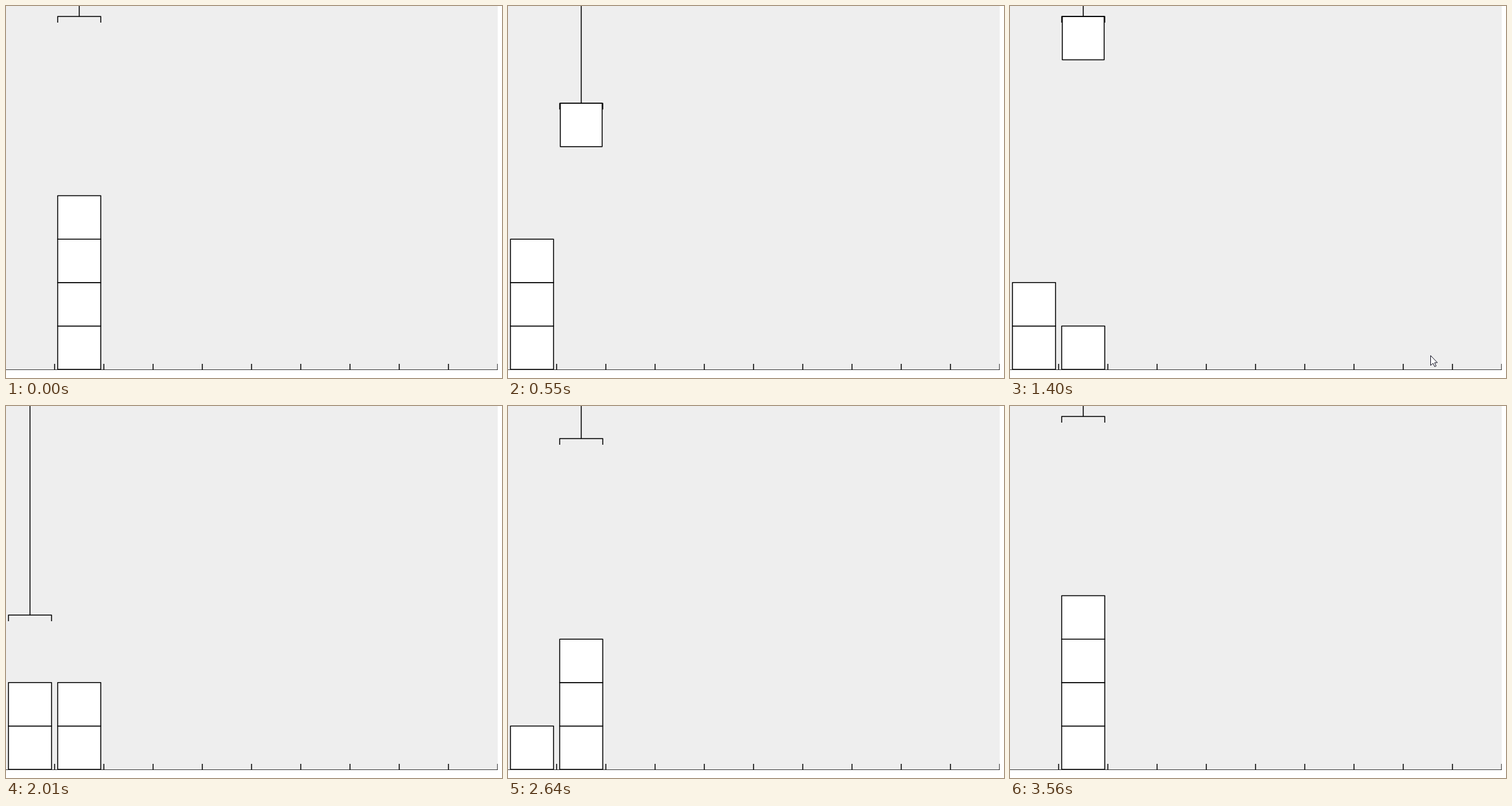
An HTML page with a canvas that plays this animation: 806x605 px, repeating every 3.73 s.

```html
<!DOCTYPE html>
<html lang="en">
<head>
<meta charset="utf-8">
<title>Crane stacking blocks</title>
<style>
  html, body { margin: 0; width: 100%; height: 100%; overflow: hidden; background: #fff; }
  canvas { display: block; }
</style>
</head>
<body>
<canvas id="stage" width="806" height="605"></canvas>
<script>
const ctx = document.getElementById('stage').getContext('2d');

const LOOP = 3730, HOLD = 170, STEPS = 45;
const SCENE_W = 799, SCENE_H = 592;
const COLUMN = 80, BOX = 70, PITCH = 70.6, GROUND = 591;
const TOP = 17, SPEED = 35.3, SIDE_TICKS = 3, BLOCKS = 4;

// Steps last 80 ms, except these, which last 70 ms.
const shortSteps = new Set([1, 4, 7, 10, 14, 17, 20, 23, 27, 33, 36, 39, 43]);
const starts = [0, HOLD];
for (let k = 0; k < STEPS - 1; k++) {
  starts.push(starts[k + 1] + (shortSteps.has(k) ? 70 : 80));
}

// Crane progress in ticks at some steps, linear in between.
const progress = [[0, -1.4], [6, 28], [17, 82], [25, 120.15], [33, 160.98], [39, 189.99], [45, 219]];

function tickAt(step) {
  const i = progress.findIndex(([s], n) => n > 0 && step <= s);
  const [s0, t0] = progress[i - 1], [s1, t1] = progress[i];
  return t0 + (t1 - t0) * (step - s0) / (s1 - s0);
}

const levelTop = level => GROUND - PITCH * level;

// Every block: go left, down, up, go right, down, up.
const moves = [];
for (let block = 0; block < BLOCKS; block++) {
  const moved = block + 1;
  const pick = levelTop(BLOCKS - block), drop = levelTop(moved);
  const move = (type, column, target, holding, left, right) => moves.push({
    type, column, target, holding, left, right,
    ticks: type === 'side' ? SIDE_TICKS : Math.ceil((target - TOP) / SPEED)
  });
  const before = BLOCKS - block, after = before - 1;
  move('side', 0, TOP, false, before, block);
  move('down', 0, pick, false, before, block);
  move('up', 0, pick, true, after, block);
  move('side', 1, TOP, true, after, block);
  move('down', 1, drop, true, after, block);
  move('up', 1, drop, false, after, moved);
}

function craneState(step) {
  let tick = tickAt(step);
  if (tick > 0) {
    for (const m of moves) {
      if (tick > m.ticks) { tick -= m.ticks; continue; }
      let x = m.column * COLUMN, y = TOP;
      if (m.type === 'side') {
        const rest = Math.max(0, COLUMN - tick * SPEED);
        x += m.column ? -rest : rest;
      } else {
        const way = m.type === 'down' ? tick : m.ticks - tick;
        y = Math.min(TOP + way * SPEED, m.target);
      }
      return { ...m, x, y };
    }
  }
  return { x: COLUMN, y: TOP, holding: false, left: 0, right: BLOCKS };
}

function lines(...paths) {
  ctx.beginPath();
  for (const path of paths) {
    path.forEach(([x, y], i) => i ? ctx.lineTo(x, y) : ctx.moveTo(x, y));
  }
  ctx.stroke();
}

function box(x, y, w, h) {
  ctx.beginPath();
  ctx.rect(x, y, w, h);
  ctx.fill();
  ctx.stroke();
}

function stack(column, count) {
  for (let i = 1; i <= count; i++) {
    box(column * COLUMN + 4, levelTop(i), BOX, PITCH);
  }
}

function crane({ x, y, holding }) {
  const left = x + 4, right = left + BOX, middle = x + 39;
  if (holding) box(left + 1, y, BOX - 2, PITCH);
  lines([[middle, 0], [middle, y]],
        [[left, y + 10], [left, y], [right, y], [right, y + 10]]);
}

// The mouse pointer crosses the scene and leaves at the lower right.
const pointerX = [326, 470, 590, 683, 775], POINTER_FIRST = 14;
const arrow = [[0, 0], [0, 16], [4, 12.5], [6.5, 18], [9, 17], [6.5, 11.5], [11, 11.5]];

function pointer(step) {
  const x = pointerX[step - POINTER_FIRST];
  if (x === undefined) return;
  const y = Math.round(568 + (x - 683) * 0.26);
  ctx.save();
  ctx.translate(x + 0.5, y + 0.5);
  ctx.lineWidth = 1;
  ctx.strokeStyle = '#112';
  ctx.beginPath();
  arrow.forEach(([px, py]) => ctx.lineTo(px, py));
  ctx.closePath();
  ctx.fill();
  ctx.stroke();
  ctx.restore();
}

function draw(time) {
  let step = STEPS;
  while (starts[step] > time) step--;
  const state = craneState(step);

  ctx.fillStyle = '#fff';
  ctx.fillRect(0, 0, 806, 605);
  ctx.save();
  ctx.beginPath();
  ctx.rect(0, 0, SCENE_W, SCENE_H);
  ctx.clip();
  ctx.fillStyle = '#eee';
  ctx.fillRect(0, 0, SCENE_W, SCENE_H);

  ctx.fillStyle = '#fff';
  ctx.strokeStyle = '#000';
  ctx.lineWidth = 1.5;
  ctx.lineJoin = 'round';
  lines([[0, SCENE_H], [SCENE_W, SCENE_H]]);
  for (let x = COLUMN - 1; x <= SCENE_W; x += COLUMN) {
    lines([[x, 582], [x, SCENE_H]]);
  }
  stack(0, state.left);
  stack(1, state.right);
  crane(state);
  ctx.restore();

  ctx.fillStyle = '#fff';
  pointer(step);
}

function loop() {
  draw(performance.now() % LOOP);
  requestAnimationFrame(loop);
}
loop();
</script>
</body>
</html>
```
